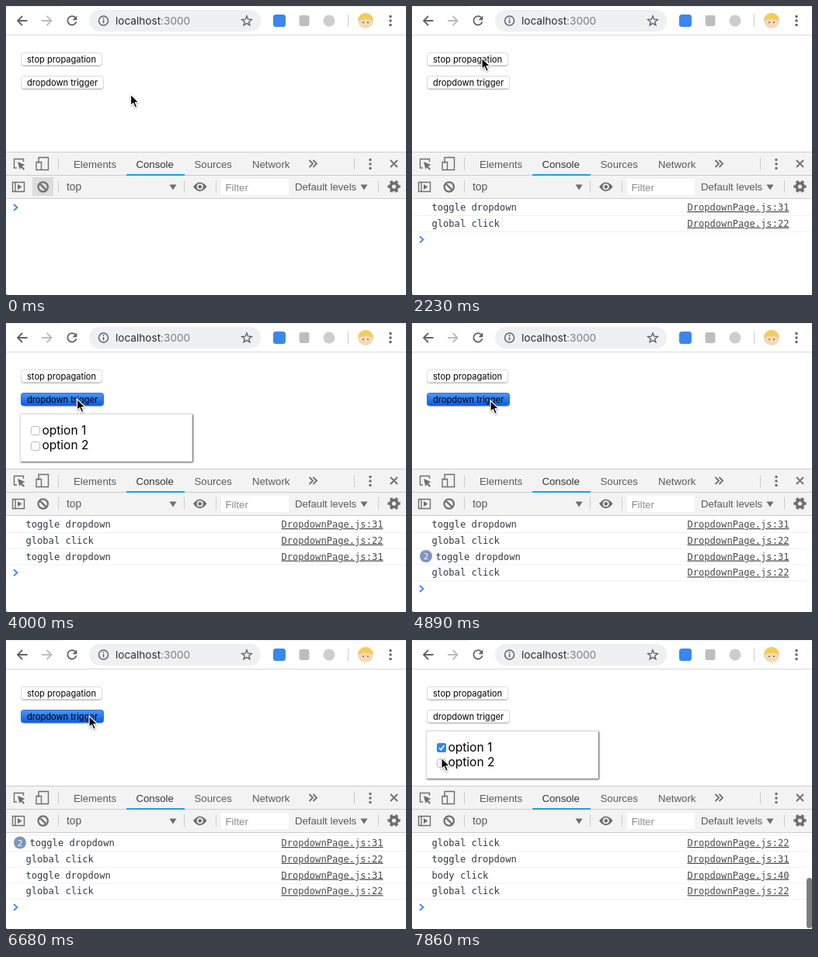
Write an HTML page that moves like this. It is 515 px wide and 373 px high and loops after 8 s.

```html
<!DOCTYPE html>
<html lang="en">
<head>
<meta charset="utf-8">
<title>Dropdown and console</title>
<style>
  html, body { margin: 0; height: 100%; overflow: hidden; background: #fff; }
  svg { display: block; }
  text { white-space: pre; }
  .page { font-family: Inter, sans-serif; fill: #000; }
  .tools { font: 13.2px "Liberation Sans", Arial, sans-serif; fill: #5a5a5a; }
  .log { font: 12.1px "DejaVu Sans Mono", monospace; fill: #303942; }
  .link { text-anchor: end; text-decoration: underline; fill: #4a4a4a; }
  .line { fill: none; stroke: #5f6368; stroke-width: 1.8; }
  .thin { fill: none; stroke: #6e6e6e; stroke-width: 1.4; }
  .rule { fill: none; stroke: #ccc; }
  .solid { fill: #6e6e6e; }
  #panel rect.sheet { fill: #fff; stroke: #ddd; filter: drop-shadow(1px 1px 1px rgba(0,0,0,.65)); }
  .box { fill: #fff; stroke: #bcbcbc; }
</style>
</head>
<body>
<svg width="515" height="373" viewBox="0 0 515 373">
  <defs>
    <linearGradient id="blue" x2="0" y2="1">
      <stop stop-color="#4c98f8"/><stop offset="1" stop-color="#0b59e4"/>
    </linearGradient>
  </defs>

  <!-- browser toolbar -->
  <path d="M0 .3H73M323 .3H515" stroke="#dcdfe3" stroke-width=".6"/>
  <path class="line" d="M27.5 19H15.5M21 13L15 19L21 25"/>
  <path class="line" style="stroke:#b9bbbe" d="M46 19H58M52.5 13L58.500 19L52.500 25"/>
  <path class="line" d="M89.300 15A5.700 5.700 0 1 0 90.500 20.300"/>
  <path d="M91.300 12.500V18.300H85.500Z" fill="#5f6368"/>
  <rect x="107" y="5" width="221" height="28" rx="14" fill="#eff0f2"/>
  <circle class="line" cx="125.500" cy="19" r="6" style="stroke-width:1.500"/>
  <path class="line" style="stroke-width:1.600" d="M125.500 18V22.300M125.500 15.300V16.900"/>
  <text class="page" x="141" y="24" font-size="13.6" style="fill:#2b2d30">localhost<tspan fill="#7b7e82">:3000</tspan></text>
  <path id="star" class="line" style="stroke-width:1.400"/>
  <rect x="344" y="11" width="16" height="16" rx="3.500" fill="#3b87ef"/>
  <rect x="377.500" y="12" width="13" height="14" rx="3" fill="#bdbdbd"/>
  <circle cx="416" cy="19" r="7.500" fill="#cdcdcd"/>
  <path class="rule" d="M440.500 11V27"/>
  <circle cx="463" cy="19" r="10" fill="#f3d9b8"/>
  <path d="M453 19A10 10 0 0 1 473 19Q463 14 453 19Z" fill="#f3cc58"/>
  <path d="M460 20.500v1.500M466 20.500v1.500" stroke="#444" stroke-width="1.500"/>
  <g fill="#5f6368"><circle cx="495" cy="13.500" r="1.700"/><circle cx="495" cy="19" r="1.700"/><circle cx="495" cy="24.500" r="1.700"/></g>
  <path class="rule" style="stroke:#d9d9d9" d="M0 37.500H515"/>

  <!-- page -->
  <g class="page" font-size="11.1">
    <rect x="19.500" y="61" width="104" height="16.500" rx="3" fill="none" stroke="#bbb"/>
    <rect id="stop" x="19.500" y="60.500" width="104" height="16" rx="3"/>
    <text x="27" y="73">stop propagation</text>
    <rect x="19.500" y="91" width="106" height="16.500" rx="3" fill="none" stroke="#bbb"/>
    <rect id="trigger" x="19.500" y="90.500" width="106" height="16" rx="3"/>
    <text x="27" y="103">dropdown trigger</text>
  </g>
  <g id="panel" class="page" font-size="15.5">
    <rect class="sheet" x="18.500" y="117.500" width="221" height="61"/>
    <rect class="box" x="32.500" y="133.500" width="11" height="11" rx="2.500"/>
    <rect class="box" x="32.500" y="153.500" width="11" height="11" rx="2.500"/>
    <g id="tick">
      <rect x="32" y="133" width="12" height="12" rx="2.500" fill="#3583f5"/>
      <path d="M35 139.300L37.300 141.800L41.300 136" fill="none" stroke="#fff" stroke-width="1.600"/>
    </g>
    <text x="46.500" y="143.500">option 1</text>
    <text x="46.500" y="163">option 2</text>
  </g>

  <!-- developer tools -->
  <rect y="188" width="515" height="61" fill="#f3f3f3"/>
  <rect x="277" y="223" width="87" height="21" fill="#fff"/>
  <rect id="hover" x="34" y="221" width="27" height="24" fill="#dcdcdc"/>
  <path class="rule" d="M0 188.500H515M0 218.500H515M0 248.500H515M67.500 196V212M448.500 196V212M67.500 225V241M229.500 225V241M270.500 225V241M479.500 225V241"/>
  <rect x="155" y="217" width="75" height="2" fill="#1ba1e2"/>
  <g class="tools">
    <text x="87" y="209">Elements</text>
    <text x="167.500" y="209" style="fill:#333">Console</text>
    <text x="242.500" y="209">Sources</text>
    <text x="317" y="209">Network</text>
    <text x="78" y="238" font-size="13.8">top</text>
    <text x="282.500" y="239" style="fill:#8a8a8a">Filter</text>
    <text x="372" y="238">Default levels</text>
  </g>
  <path class="thin" d="M14 209H10.500V197.500H22.500V201M42 203V195.500H54.500V211.500H46M39 201.500H45.500V211.500H39ZM8.500 227.500H23.500V239.500H8.500ZM12 227.500V239.500"/>
  <path class="solid" d="M15 201L24.500 205L20.700 206.800L24 210.200L22.500 211.700L19.200 208.300L17.500 211ZM15 230L20.500 233.500L15 237ZM210.500 230.500H219.500L215 237.500ZM456.500 230.500H465.500L461 237.500Z"/>
  <path class="line" style="stroke:#6e6e6e" d="M390.500 199L395 203.500L390.500 208M395.500 199L400 203.500L395.500 208M495 199L504 208M504 199L495 208"/>
  <g class="solid"><circle cx="469" cy="198.500" r="1.700"/><circle cx="469" cy="204" r="1.700"/><circle cx="469" cy="209.500" r="1.700"/></g>
  <path class="thin" style="stroke-width:2.200" d="M41.500 233.500a6.200 6.200 0 1 0 12.400 0a6.200 6.200 0 1 0-12.400 0M43.300 229.100L52.100 237.900"/>
  <path class="solid" d="M241 233.300Q249.700 221.500 258.500 233.300Q249.700 245 241 233.300Z"/>
  <circle cx="249.700" cy="233.300" r="3.200" fill="#6e6e6e" stroke="#f3f3f3" stroke-width="1.700"/>
  <circle class="thin" cx="499.500" cy="233" r="4.400" style="stroke-width:3.600"/>
  <circle class="thin" cx="499.500" cy="233" r="6.800" style="stroke-width:2.800" pathLength="12" stroke-dasharray="1" stroke-dashoffset=".5"/>

  <!-- console -->
  <svg y="249" width="515" height="124" viewBox="0 249 515 124">
    <g id="rows" class="log"></g>
    <path id="prompt" d="M10 256L14.500 260L10 264" fill="none" stroke="#3c82f6" stroke-width="1.700"/>
    <rect id="thumb" x="508" width="7" rx="3.500" fill="#7d7d7d"/>
  </svg>
  <path d="M0 371.500L1.500 373H0Z" fill="#555"/>

  <path id="cursor" d="M0 0V14.500L3.300 11.500L5.800 17.200L8.300 16.100L5.900 10.500H10.500Z" stroke="#fff" stroke-width="1.200" style="filter:drop-shadow(0 1px 1px rgba(0,0,0,.35))"/>
</svg>
<script>
const LOOP = 8000, ROW = 20.75, TICK = 148;
const $ = id => document.getElementById(id);
const show = (el, on) => el.setAttribute('visibility', on ? 'visible' : 'hidden');
const within = (t, spans) => spans.some(([a, b]) => t >= a && t < b);

// Each move: start, x, y, number of discrete hops.
const moves = [
  [300, 84.3, 98.5, 4], [1480, 90, 67, 4], [2670, 91.5, 98, 3], [4450, 101, 100, 2],
  [5187, 170, 100, 4], [6230, 107, 98, 3], [7120, 38, 136, 3], [7860, 38, 152, 1]
];
const triggerDown = [[885, 1030], [3112, 3260], [4000, 4150], [4890, 5038], [6680, 6830]];
const stopDown = [[2080, 2230]];
const open = [[1030, 2230], [3260, 4150], [5038, 5930], [6830, LOOP]];
const lines = { 'toggle dropdown': 31, 'global click': 22, 'body click': 40 };
const logs = [
  [1030, 'toggle'], [2230, 'global'], [3260, 'toggle'], [4150, 'global'], [5038, 'toggle'],
  [5930, 'global'], [6830, 'toggle'], [7710, 'body'], [7710, 'global']
];
const repeated = 2, repeatTime = 4150;

$('star').setAttribute('d', 'M' + Array.from({ length: 10 }, (_, i) => {
  const r = i % 2 ? 2.9 : 6.6, a = (i / 5 - .5) * Math.PI;
  return `${310 + r * Math.cos(a)} ${19.5 + r * Math.sin(a)}`;
}).join('L') + 'Z');

$('rows').innerHTML = logs.map(([, kind], i) => {
  const y = 260 + i * ROW;
  const message = Object.keys(lines).find(m => m.startsWith(kind));
  const badge = i === repeated
    ? `<g id="badge"><circle cx="18" cy="${y - .5}" r="8" fill="#7d95c0"/>
       <text x="18" y="${y + 3.5}" text-anchor="middle" font-size="11" style="fill:#fff">2</text></g>` : '';
  return `<g>${badge}<text class="message" x="25.500" y="${y + 4}">${message}</text>
    <text class="link" x="485.500" y="${y + 4}">DropdownPage.js:${lines[message]}</text>
    <path d="M0 ${y + 10.5}H515" stroke="#f0f0f0"/></g>`;
}).join('');
const rows = [...$('rows').children];
const repeatText = rows[repeated].querySelector('.message');

function cursorAt(t) {
  let x = 160.5, y = 114;
  for (const [start, toX, toY, hops] of moves) {
    if (t < start) break;
    const p = Math.min(1, (Math.floor((t - start) / TICK) + 1) / hops);
    const e = p < .5 ? 2 * p * p : 1 - 2 * (1 - p) ** 2;
    x += (toX - x) * e;
    y += (toY - y) * e;
  }
  return `translate(${x} ${y})`;
}

function paintButton(id, down) {
  $(id).setAttribute('fill', down ? 'url(#blue)' : '#fff');
  $(id).setAttribute('stroke', down ? '#2a6fe0' : '#dcdcdc');
}

function render(t) {
  $('cursor').setAttribute('transform', cursorAt(t));
  paintButton('trigger', within(t, triggerDown));
  paintButton('stop', within(t, stopDown));
  $('panel').style.display = within(t, open) ? '' : 'none';
  show($('tick'), t >= 7710);
  show($('hover'), t < 300);

  const count = logs.filter(([time]) => t >= time).length;
  const scroll = count > 4 ? (count - 4) * ROW - 2 : 0;
  rows.forEach((row, i) => { row.style.display = i < count ? '' : 'none'; });
  $('rows').setAttribute('transform', `translate(0 ${-scroll})`);
  $('prompt').setAttribute('transform', `translate(0 ${count * ROW - scroll})`);
  $('badge').style.display = t >= repeatTime ? '' : 'none';
  repeatText.setAttribute('x', t >= repeatTime ? 30.5 : 25.5);

  const height = 650 / (count + 1);
  $('thumb').setAttribute('y', 372 - height);
  $('thumb').setAttribute('height', height);
  show($('thumb'), count > 4 && t - logs[count - 1][0] < 550);
}

(function frame() {
  render(performance.now() % LOOP);
  requestAnimationFrame(frame);
})();
</script>
</body>
</html>
```
